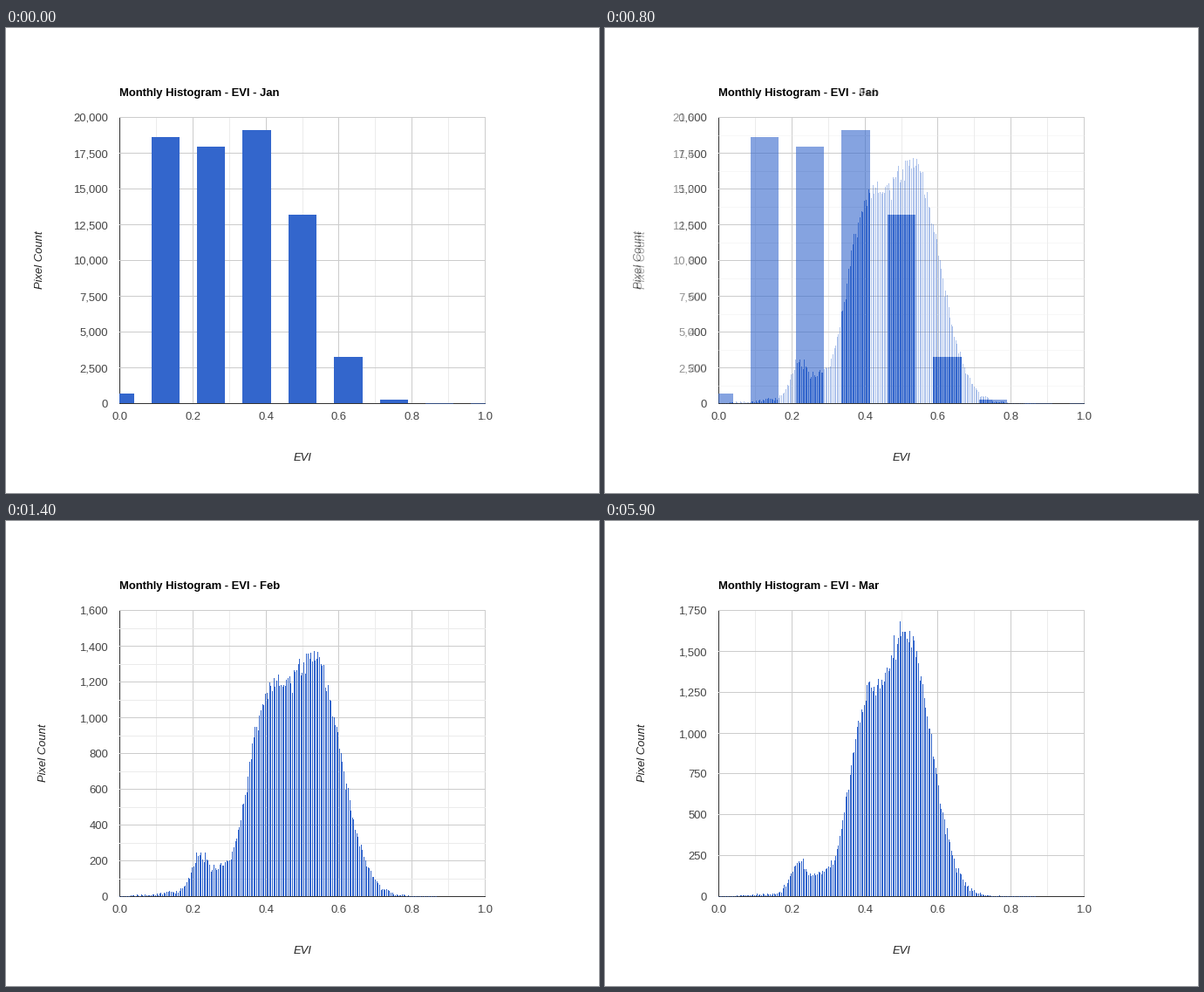
A matplotlib script for the animation above (8000 ms loop, 680 px wide and 533 px high).

```python
import math

import matplotlib.pyplot as plt
import numpy as np
from matplotlib.animation import FuncAnimation
from matplotlib.patches import Rectangle

WIDTH, HEIGHT, DPI = 680, 533, 64
LEFT, RIGHT, TOP, BOTTOM = 130, 550, 102, 430
SPAN_X, SPAN_Y = 419, BOTTOM - TOP
BLUE, MAJOR, MINOR, AXIS = "#3366cc", "#cccccc", "#ebebeb", "#333333"
FRAMES, INTERVAL = 80, 100
FADE_STARTS, FADE_TIME = (400, 4900), 1000

plt.rcParams["font.family"] = "Liberation Sans"
fig = plt.figure(figsize=(WIDTH / DPI, HEIGHT / DPI), dpi=DPI, facecolor="white")


def snap(value):
    return math.floor(value + 0.5)


def box(ax, x0, y0, x1, y1, color):
    ax.add_patch(Rectangle((x0, y0), x1 - x0, y1 - y0, fc=color, lw=0, snap=False))


def label(ax, x, y, text, color="#444444", **style):
    ax.text(x, y, text, color=color, fontsize=13 * 72 / DPI, va="baseline",
            rotation_mode="anchor", **style)


def vertical_lines(ax, fractions, color):
    for f in fractions:
        x = snap(LEFT + SPAN_X * f)
        box(ax, x, TOP, x + 1, BOTTOM + 1, color)


def horizontal_lines(ax, fractions, color):
    for f in fractions:
        y = snap(BOTTOM - SPAN_Y * f)
        box(ax, LEFT, y, RIGHT, y + 1, color)


def draw_grid(ax, rows, minor_rows):
    vertical_lines(ax, np.arange(0.1, 1, 0.2), MINOR)
    vertical_lines(ax, np.arange(6) / 5, MAJOR)
    vertical_lines(ax, [0], AXIS)
    if minor_rows:
        horizontal_lines(ax, (np.arange(rows) + 0.5) / rows, MINOR)
    horizontal_lines(ax, np.arange(rows + 1) / rows, MAJOR)
    horizontal_lines(ax, [0], AXIS)


def draw_bars(ax, counts, pitch, y_max):
    step = SPAN_X * pitch
    half = 0.309 * step
    for k, count in enumerate(counts):
        center = LEFT + 0.5 + step * k
        x0 = snap(center - half)
        x1 = x0 + 1 if step < 2 else snap(center + half)
        y0 = BOTTOM - snap(SPAN_Y * count / y_max)
        # Empty bins still leave a half-pixel trace on the baseline.
        box(ax, max(x0, LEFT), y0, min(x1, RIGHT), max(BOTTOM, y0 + 0.5), BLUE)


def render_chart(month, counts, pitch, y_max, y_step, title_x, minor_rows=False):
    """Draw one month's histogram and return it as an RGB array."""
    ax = fig.add_axes([0, 0, 1, 1])
    ax.set(xlim=(0, WIDTH), ylim=(HEIGHT, 0))
    ax.axis("off")

    rows = y_max // y_step
    draw_grid(ax, rows, minor_rows)
    draw_bars(ax, counts, pitch, y_max)

    label(ax, 130, 78, f"Monthly Histogram - EVI - {month}", "black", weight="bold")
    for i in range(6):
        label(ax, LEFT + 0.5 + SPAN_X * i / 5, 449, f"{i / 5:.1f}", ha="center")
    for i in range(rows + 1):
        y = snap(BOTTOM - SPAN_Y * i / rows) + 5
        label(ax, 117, y, f"{i * y_step:,}", ha="right")
    label(ax, 340, 496, "EVI", "#222222", style="italic", ha="center")
    label(ax, title_x, 266, "Pixel Count", "#222222", style="italic",
          ha="center", rotation=90)

    fig.canvas.draw()
    pixels = np.asarray(fig.canvas.buffer_rgba())[..., :3].astype(float)
    fig.clear()
    return pixels


def sample_counts(humps, seed):
    """Random counts in 1/256-wide bins around a sum of (center, height, width) bells."""
    evi = np.arange(223) / 256
    expected = sum(h * np.exp(-((evi - c) / w) ** 2 / 2) for c, h, w in humps)
    return np.random.default_rng(seed).poisson(expected)


jan = [690, 18600, 17950, 19100, 13180, 3250, 260, 20, 5]
feb = sample_counts([(0.53, 1330, 0.073), (0.393, 880, 0.049), (0.275, 110, 0.022),
                     (0.22, 212, 0.022), (0.16, 20, 0.06)], seed=2)
mar = sample_counts([(0.515, 1600, 0.0655), (0.392, 860, 0.043), (0.28, 105, 0.024),
                     (0.22, 195, 0.022), (0.16, 13, 0.06)], seed=3)

charts = [
    render_chart("Jan", jan, 1 / 8, 20000, 2500, 42),
    render_chart("Feb", feb, 1 / 256, 1600, 200, 46, minor_rows=True),
    render_chart("Mar", mar, 1 / 256, 1750, 250, 46),
]
screen = fig.figimage(charts[0].astype(np.uint8), origin="upper")


def update(frame):
    time = frame * INTERVAL
    picture = charts[0]
    for start, chart in zip(FADE_STARTS, charts[1:]):
        mix = min(max((time - start) / FADE_TIME, 0), 1)
        picture = (1 - mix) * picture + mix * chart
    screen.set_data(np.rint(picture).astype(np.uint8))
    return [screen]


animation = FuncAnimation(fig, update, frames=FRAMES, interval=INTERVAL,
                          repeat=True, repeat_delay=0)
plt.show()
```
